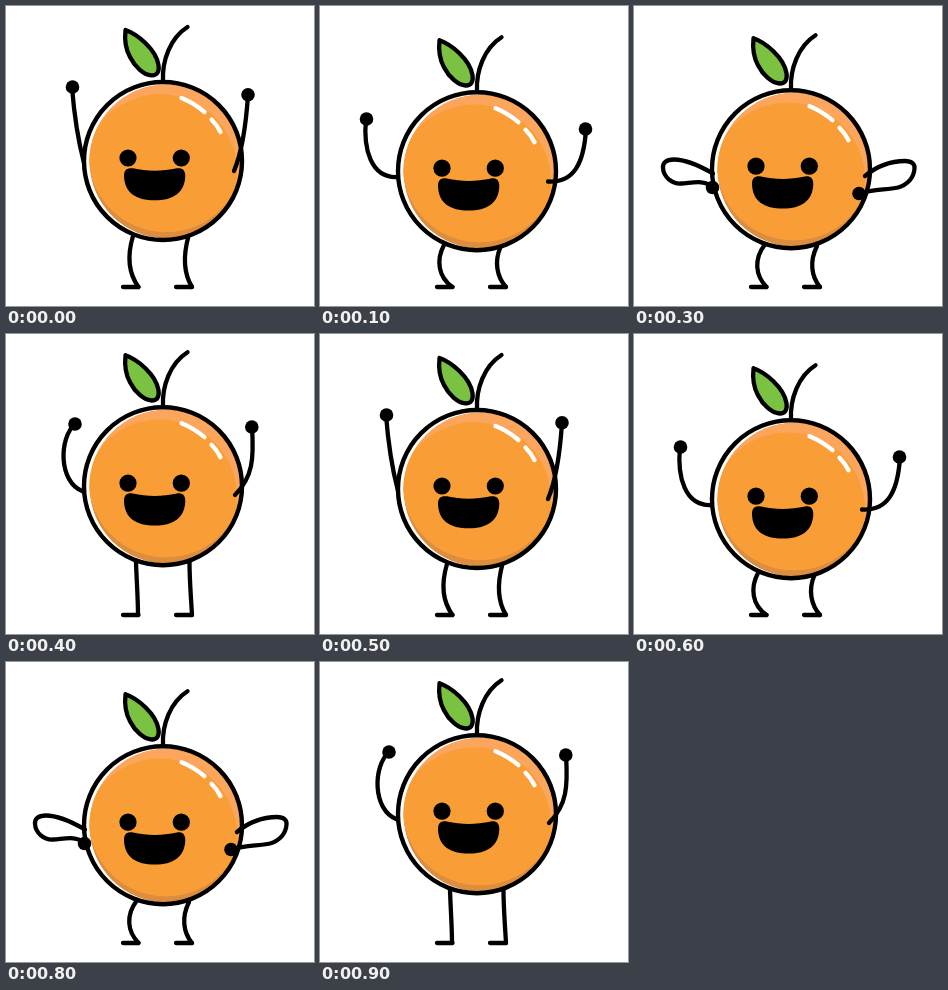
An HTML page with a canvas that plays this animation: 308x300 px, repeating every 1 s.

```html
<!DOCTYPE html>
<html lang="en">
<head>
<meta charset="utf-8">
<title>Dancing orange</title>
<style>
html, body { margin: 0; width: 100%; height: 100%; overflow: hidden; background: #fff; }
canvas { display: block; }
</style>
</head>
<body>
<canvas id="stage" width="308" height="300"></canvas>
<script>
const ctx = document.getElementById('stage').getContext('2d');
const STEP = 100;
const INK = '#000';
const CX = 157, CY = 155, R = 79;

// Body height, limb paths and hand positions for each beat of the dance.
const poses = [
  {
    y: 155,
    arms: 'M66 81C68 107 72 134 78 157M242 89C240 119 236 146 228 165',
    hands: [66.5, 81, 242, 88.7],
    legs: 'M127 230C121 250 123 268 132.5 281M182.5 230C177 250 178 268 186 281'
  },
  {
    y: 165.2,
    arms: 'M46 113C43 143 51 172 77 171M266 123C264 157 254 177 228 175.5',
    hands: [46.5, 113, 265.5, 123],
    legs: 'M124 239C116 254 118 271 132.5 281M180.5 241C174 256 177 271 186 281'
  },
  {
    y: 172.7,
    arms: 'M77 171C61 172 52 179 52 188C52 198 62 206 75 206C88 206 97 202 107 210' +
          'M237 171C252 171 262 178 262 189C262 201 250 210 236 210C225 210 215 205 201 206.5',
    hands: [107, 210, 200.5, 206.5],
    legs: 'M121 245C111 256 114 272 132.5 281M174 251C169 263 173 275 186 281'
  },
  {
    y: 163.2,
    arms: 'M79 167.5C66 160 52 153.5 40 153.5C32 153.5 28.5 157 29 162C29.5 171 38 178 47 177.5C58 177 70 173 79 181.5' +
          'M231 170C243 160 258 155 271 155C278 155 281 158 280.5 162.5C280 172 273 179 264 181.5C252 184 240 183 225 187.5',
    hands: [78.5, 181.5, 225, 187.5],
    legs: 'M130.5 239C120 253 121 269 132.5 281M183 240C175.500 255 177 270 186 281'
  },
  {
    y: 152.2,
    arms: 'M69 90C53 104 52 148 77 157.5M246 93C248 124 247 143 229 161',
    hands: [69, 90, 245.8, 93],
    legs: 'M130 228C130.5 245 132 264 132 281M183.5 228C183.5 245 185 264 186 281'
  }
];

const stem = new Path2D('M157 75C156 55 164 32 181.5 21');
const leaf = new Path2D('M119.5 24C131 28 150 43 152.5 59C153.5 66 151 69.5 145.5 69.3C138 69 129 61 124 51C119 42 118.5 33 119.5 24Z');
const mouth = new Path2D('M127 162.3C141 165.5 156 165.5 171 162.3C176 161.5 179.3 164 179.3 169.5C179 187 167 194.3 149 194.3C130 194.3 118.3 187 118 169.5C118 164 121 161.5 127 162.3Z');
const shine = new Path2D('M175.5 92Q188 97 198.5 106M205.5 113.5Q211 119 214.5 126');
const feet = new Path2D('M117 281H132.5M170 281H186');

for (const p of poses) {
  p.arms = new Path2D(p.arms);
  p.legs = new Path2D(p.legs);
}

function circle(x, y, r) {
  const path = new Path2D();
  path.arc(x, y, r, 0, Math.PI * 2);
  return path;
}

function fill(path, color = INK) {
  ctx.fillStyle = color;
  ctx.fill(path);
}

function line(path, color = INK, width = 4.3) {
  ctx.strokeStyle = color;
  ctx.lineWidth = width;
  ctx.stroke(path);
}

const rind = circle(CX, CY, R);
const flesh = circle(CX + 3.4, CY + 0.5, 77);
const belowLight = circle(CX - 3, CY + 10.3, 77);
const aboveShade = circle(CX + 3, CY - 6.5, 77.5);

function drawFruit() {
  line(stem);
  fill(leaf, '#7cc242');
  line(leaf);

  // Lit top and shaded base show around the flesh, with a white rim at left.
  fill(rind, '#fff');
  ctx.save();
  ctx.clip(rind);
  ctx.clip(flesh);
  fill(flesh, '#dc8d3d');
  fill(aboveShade, '#fba65c');
  ctx.clip(aboveShade);
  fill(belowLight, '#f99d36');
  ctx.restore();
  line(rind, INK, 4.4);

  line(shine, '#fff', 4.3);
  fill(circle(122, 152, 8.6));
  fill(circle(175.3, 152, 8.6));
  fill(mouth);
}

function draw(p) {
  ctx.fillStyle = '#fff';
  ctx.fillRect(0, 0, 308, 300);
  ctx.lineCap = ctx.lineJoin = 'round';
  line(p.legs);
  line(feet);

  ctx.save();
  ctx.translate(0, p.y - CY);
  drawFruit();
  ctx.restore();

  line(p.arms);
  const [lx, ly, rx, ry] = p.hands;
  fill(circle(lx, ly, 6.8));
  fill(circle(rx, ry, 6.8));
}

const start = performance.now();
function tick() {
  const t = performance.now() - start;
  draw(poses[Math.floor(t / STEP) % poses.length]);
  requestAnimationFrame(tick);
}
tick();
</script>
</body>
</html>
```
